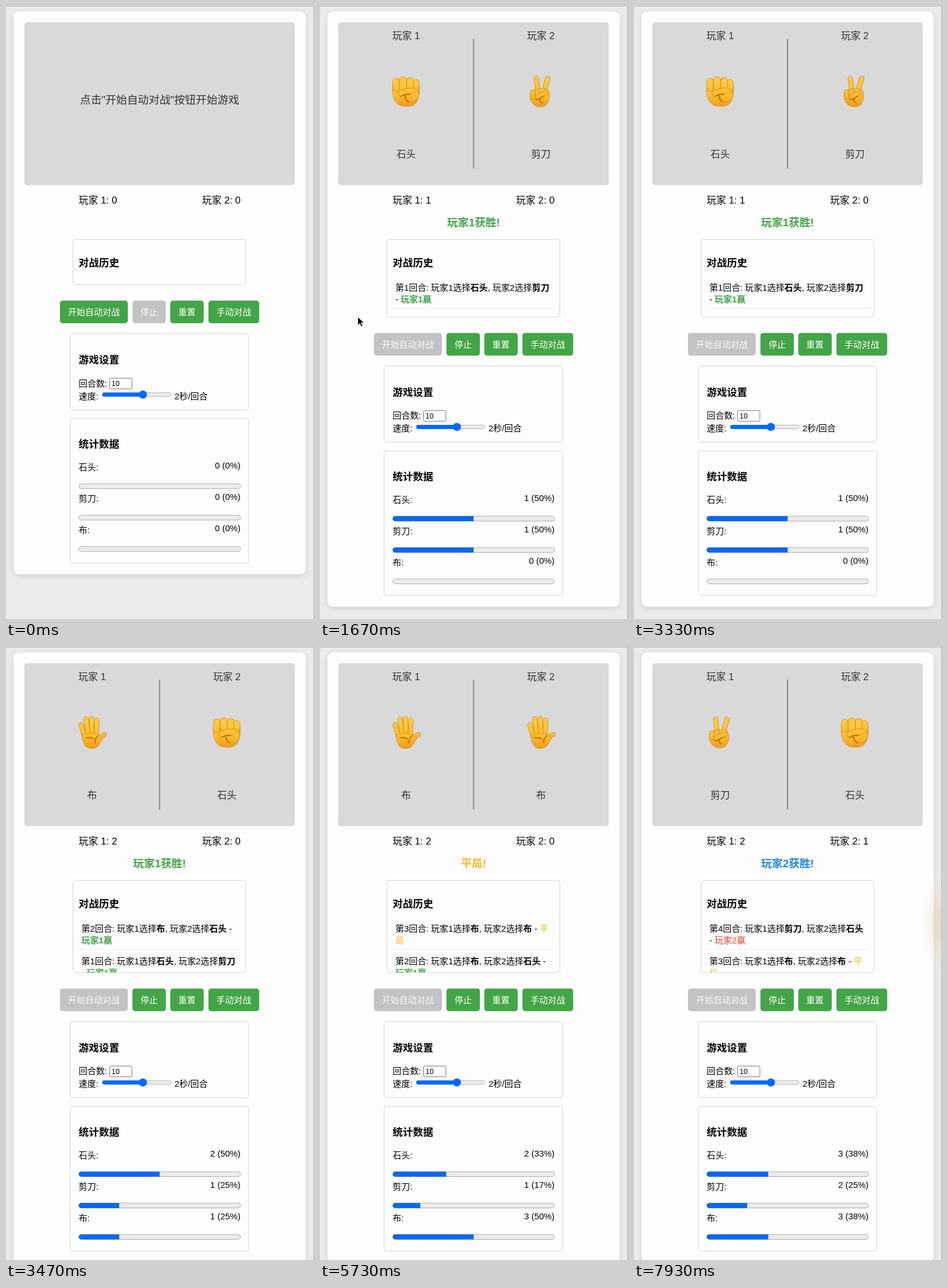
An HTML page for the animation above (8 s loop, 531 by 1055 pixels).

```html
<!DOCTYPE html>
<html lang="zh-CN">
<head>
<meta charset="utf-8">
<style>
  html, body { margin: 0; width: 100%; height: 100%; overflow: hidden; background: #ebebeb; }
  svg { display: block; }
  svg, .entry { font: 14.93px "Liberation Sans", "Noto Sans CJK SC", sans-serif; }
  text { white-space: pre; }
  .entry { line-height: 20.5px; padding: 4.7px; margin-bottom: 4.7px; border-bottom: 1px solid #ebebeb; }
</style>
</head>
<body>
<svg width="531" height="1055" viewBox="0 0 531 1055">
  <defs>
    <linearGradient id="skin" gradientUnits="userSpaceOnUse" x1="0" y1="-26" x2="0" y2="28">
      <stop stop-color="#ffcf45"/><stop offset=".6" stop-color="#fdbd2f"/><stop offset="1" stop-color="#f09a18"/>
    </linearGradient>
    <radialGradient id="warm">
      <stop stop-color="#e2bd7c" stop-opacity=".55"/><stop offset=".5" stop-color="#e6cfa2" stop-opacity=".3"/>
      <stop offset="1" stop-color="#ece0cc" stop-opacity="0"/>
    </radialGradient>
    <filter id="shadow" x="-10%" y="-10%" width="120%" height="120%">
      <feDropShadow dx="0" dy="3" stdDeviation="4" flood-opacity=".12"/>
    </filter>
  </defs>
  <g id="page"></g>
  <path d="M0 .5H531" stroke="#bdbdbd"/>
  <path d="M530.5 0V1055" stroke="#a6a6a6"/>
  <ellipse id="glow" cx="540" cy="476" rx="46" ry="98" fill="url(#warm)"/>
  <g id="cursor" stroke-linejoin="round">
    <path id="arrow" d="M0 0V15L3.6 11.8 6 17.2 8.6 16 6.2 10.8H11Z" stroke="#fff"/>
    <path id="pointer" fill="#fff" stroke="#111" d="M-1.5 8V1Q0-1 1.5 1V6Q3 5 4 6.500Q6 6 6.500 7.500Q8 7 8 9V12L6.500 17H-1L-5.500 11Q-6 8-3 9.500L-1.500 11Z"/>
  </g>
</svg>
<script>
const LOOP = 8000, FIRST = 1440, INTERVAL = 2000, MID = 264.7;
const GREEN = '#43a547', GREY = '#c3c3c3', BLUE = '#0068ff', AMBER = '#fbb625';
const NAMES = ['石头', '剪刀', '布'];
const ROUNDS = [[0, 1], [2, 0], [2, 2], [1, 0]];
const winner = ([a, b]) => a === b ? 0 : (b - a + 3) % 3 === 1 ? 1 : 2;
const el = id => document.getElementById(id);

const text = (s, x, y, { size = 14.93, anchor = 'start', fill = '#000', weight = 400 } = {}) =>
  `<text x="${x}" y="${y}" font-size="${size}" text-anchor="${anchor}" fill="${fill}" font-weight="${weight}">${s}</text>`;
const rect = (x, y, w, h, r, fill, extra = '') =>
  `<rect x="${x}" y="${y}" width="${w}" height="${h}" rx="${r}" fill="${fill}" ${extra}/>`;
const panel = (x, y, w, h, title, titleY) =>
  rect(x, y, w, h, 4.5, 'none', 'stroke="#d4d4d4"') + text(title, 125.3, titleY, { size: 17.47, weight: 700 });

// Hands are built from outlined strokes, centred on 0,0
const finger = (d, w = 9) => ['#c8811c', 'url(#skin)'].map((c, i) =>
  `<path d="${d}" fill="none" stroke="${c}" stroke-width="${w - i * 1.6}" stroke-linecap="round" stroke-linejoin="round"/>`).join('');
const palm = d => `<path d="${d}" fill="url(#skin)" stroke="#d28a1c" stroke-width=".8"/>`;
const crease = d => `<path d="${d}" fill="none" stroke="#a85f0c" stroke-width="1.5" stroke-linecap="round"/>`;
const HANDS = [
  palm('M-23-9Q-25 8-19 16Q-14 25-3 25.500H6Q17 24 20 14Q24 6 23-9Z') +
    finger('M17-15V-6', 11.5) + finger('M6.500-18V-6', 12.5) + finger('M-5.500-19V-6', 13) + finger('M-17.500-17V-6', 12) +
    finger('M17 1Q8-3-2 1L-9 3', 11) + palm('M21-2Q24 8 18 16Q8 22 1 14Q-3 7 8 5Z') +
    crease('M-9 9Q-2 4 6 5M-2 6Q-3 14 4 18'),
  finger('M-5 1L-8-22.500', 8.5) + finger('M5 1L12-22.500', 8.5) +
    palm('M-18 2Q-20 16-13 22Q-8 27 2 26.500Q12 25 14 14Q17 5 12-3L3-5-10-3Z') +
    finger('M-14 1V9', 9) + finger('M-6 0V8', 9) + finger('M9 3Q3 4-6 10', 9) +
    crease('M-9 14Q-2 14 4 8M-2 13Q-3 18 3 20'),
  finger('M-13 8L-19-13', 8.5) + finger('M-7 4L-10.500-23', 8.5) + finger('M0 4L-1.500-24', 8.5) + finger('M7 5L8.500-21', 8.5) +
    finger('M10 16Q13 6 21 4', 8.5) +
    palm('M-17 4Q-17 16-12 23Q-9 27.500 0 27.500Q9 27 12 21L19 9Q12 6 10.500 4Q0-1-17 4Z') +
    crease('M10 6Q4 11 5 18M-11 9Q-3 8 2 11')
];

const bar = (y, percent) => {
  const w = 2.788 * percent;
  return rect(125.5, y, 278.8, 8.6, 4.3, '#ebebeb') +
    (percent ? `<path d="M129.800 ${y}H${125.5 + w}v8.600H129.800a4.300 4.300 0 0 1 0-8.600" fill="${BLUE}"/>` : '') +
    rect(125.5, y, 278.8, 8.6, 4.3, 'none', 'stroke="#000" stroke-opacity=".32" stroke-width=".9"');
};

function arena(picks) {
  const label = (s, x, y, size = 16.8) => text(s, x, y, { size, anchor: 'middle', fill: '#333' });
  if (!picks) return label('点击"开始自动对战"按钮开始游戏', MID, 168, 18.66);
  return `<path d="M${MID} 56.500V279.500" stroke="#808080" stroke-width="1.9"/>` + picks.map((p, i) => {
    const x = 148.5 + 232.3 * i;
    return label('玩家 ' + (i + 1), x, 57) + label(NAMES[p], x, 261) +
      `<g transform="translate(${x} 147)">${HANDS[p]}</g>`;
  }).join('');
}

function entry(picks, i) {
  const w = winner(picks);
  const style = ['color:' + AMBER, `color:${GREEN};font-weight:700`, 'color:#e0432b'][w];
  const [a, b] = picks.map(p => `<b>${NAMES[p]}</b>`);
  return `<div class="entry">第${i + 1}回合: 玩家1选择${a}, 玩家2选择${b} - <span style="${style}">${w ? `玩家${w}赢` : '平局'}</span></div>`;
}

function drawPage(count, hover) {
  const played = ROUNDS.slice(0, count), last = played[count - 1];
  const score = n => played.filter(r => winner(r) === n).length;
  const shift = [0, 55.7, 80.7][Math.min(count, 2)];
  const w = last && winner(last);
  let s = rect(13, 9.5, 503.5, 968.5 + shift, 9.3, '#fdfdfd', 'filter="url(#shadow)"') +
    rect(31.5, 28, 466.3, 280.2, 4.7, '#d9d9d9') + arena(last) +
    text('玩家 1: ' + score(1), 125.3, 340, { size: 16.8 }) +
    text('玩家 2: ' + score(2), 404.3, 340, { size: 16.8, anchor: 'end' });
  if (last) s += text(w ? `玩家${w}获胜!` : '平局!', MID, 379,
    { size: 18.66, weight: 700, anchor: 'middle', fill: [AMBER, GREEN, '#1f88e5'][w] });

  s += panel(115.5, 401.5, 298, 78 + shift, '对战历史', 448) +
    `<foreignObject x="125.3" y="470.1" width="279" height="${9 + shift}">` +
    `<div style="overflow:hidden;height:${9 + shift}px">${played.map(entry).reverse().join('')}</div></foreignObject>`;

  s += `<g transform="translate(0 ${shift})">`;
  [['开始自动对战', 93, 117], ['停止', 218, 57.7], ['重置', 283.2, 57.7], ['手动对战', 349, 87.5]].forEach(([name, x, width], i) => {
    const off = i === (count ? 0 : 1);
    s += rect(x, 507, width, 39, 4.7, off ? GREY : i === 0 && hover ? '#3e8f42' : GREEN) +
      text(name, x + width / 2, 532.3, { anchor: 'middle', fill: off ? '#f8f8f8' : '#fff', weight: 500 });
  });
  s += panel(110.5, 564, 308, 131, '游戏设置', 615) +
    text('回合数:', 125.3, 654.5) + text('速度:', 125.3, 676.5) + text('2秒/回合', 290.5, 676.5) +
    rect(178.5, 640.5, 38.5, 18.5, 2, '#fff', 'stroke="#767676"') + text('10', 182, 654.3, { size: 12.44 }) +
    rect(166, 665.5, 118.5, 6.5, 3.2, '#ebebeb', 'stroke="#b0b0b0" stroke-width=".9"') +
    rect(166, 665.3, 70, 7, 3.4, BLUE) + `<circle cx="236" cy="668.7" r="7" fill="${BLUE}"/>`;

  s += panel(110.5, 710, 308, 249, '统计数据', 760);
  NAMES.forEach((name, i) => {
    const y = 54 * i, n = played.flat().filter(p => p === i).length;
    const percent = count ? Math.round(n / count * 50) : 0;
    s += text(name + ':', 125.3, 799 + y) +
      text(`${n} (${percent}%)`, 404.3, 796 + y, { anchor: 'end' }) + bar(822.2 + y, percent);
  });
  el('page').innerHTML = s + '</g>';
}

// time, x, y
const PATH = [[400, 73, 800], [670, 73, 800], [800, 133, 547], [1000, 133, 547], [1130, 135, 514], [1470, 135, 514], [1900, -20, 560]];
function cursorAt(t) {
  const i = PATH.findIndex(p => p[0] > t);
  if (i < 1) return null;
  const [t0, x0, y0] = PATH[i - 1], [t1, x1, y1] = PATH[i];
  const u = (t - t0) / (t1 - t0), e = u * u * (3 - 2 * u);
  return [x0 + (x1 - x0) * e, y0 + (y1 - y0) * e];
}

let shown;
function frame(now) {
  const t = now % LOOP, pos = cursorAt(t);
  const count = t < FIRST ? 0 : 1 + Math.floor((t - FIRST) / INTERVAL);
  const hover = !!pos && !count && pos[1] < 546;
  if (shown !== count + '/' + hover) {
    shown = count + '/' + hover;
    drawPage(count, hover);
  }
  el('cursor').style.display = pos ? '' : 'none';
  if (pos) el('cursor').setAttribute('transform', `translate(${pos})`);
  el('arrow').style.display = hover ? 'none' : '';
  el('pointer').style.display = hover ? '' : 'none';
  el('glow').setAttribute('opacity', Math.min(1, Math.max(0, (t - 7800) / 130)));
  requestAnimationFrame(frame);
}
requestAnimationFrame(frame);
</script>
</body>
</html>
```
